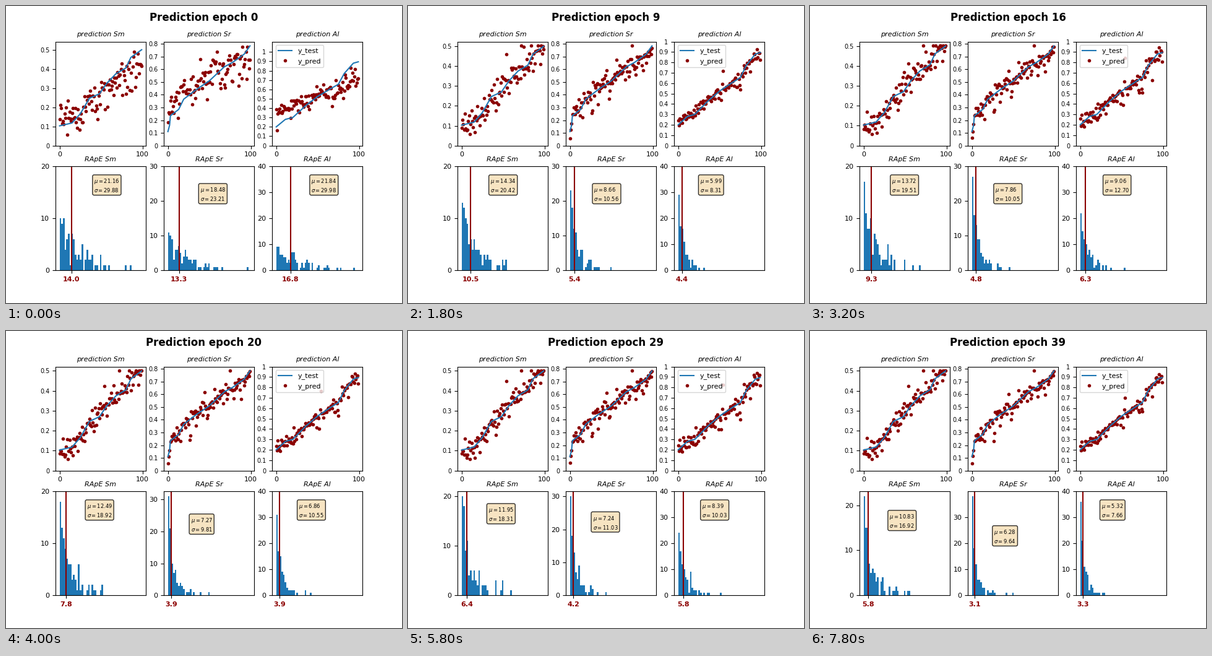
Write a matplotlib script that moves like this. It is 640 px wide and 480 px high and loops after 8000 ms.

```python
import matplotlib.pyplot as plt
import numpy as np
from matplotlib.animation import FuncAnimation

EPOCHS = 40
N = 100
IDX = np.arange(N)
BINS = np.arange(0, 100, 2)
MARKS = [0, 9, 16, 20, 29, 35, 39]

# curve: key points of y_test; start: offset, slope and spread of the first fit;
# peak: largest value before and after training
PANELS = [
    dict(
        name="Sm", ticks=6, count_step=10, count_ticks=3, box_y=15,
        start=(.06, .72, .045), peak=(.52, .5),
        curve=[(0, .103), (15, .118), (25, .166), (36, .247), (48, .27),
               (57, .325), (68, .375), (80, .405), (86, .46), (99, .5)],
        median=[14.0, 10.5, 9.3, 7.8, 6.4, 5.8, 5.8],
        mean=[21.16, 14.34, 13.72, 12.49, 11.95, 11.10, 10.83],
        sigma=[29.88, 20.42, 19.51, 18.92, 18.31, 17.10, 16.92]),
    dict(
        name="Sr", ticks=9, count_step=10, count_ticks=4, box_y=20,
        start=(.17, .70, .07), peak=(.785, .785),
        curve=[(0, .11), (2, .16), (3, .235), (13, .285), (19, .365), (34, .44),
               (50, .51), (68, .62), (78, .655), (92, .72), (99, .785)],
        median=[13.3, 5.4, 4.8, 3.9, 4.2, 3.4, 3.1],
        mean=[18.48, 8.66, 7.86, 7.27, 7.24, 6.50, 6.28],
        sigma=[23.21, 10.56, 10.05, 9.81, 11.03, 9.95, 9.64]),
    dict(
        name="Al", ticks=11, count_step=10, count_ticks=5, box_y=30,
        start=(.24, .55, .06), peak=(1.065, .94),
        curve=[(0, .2), (11, .28), (20, .3), (36, .43), (50, .525),
               (65, .605), (75, .655), (82, .77), (93, .88), (99, .895)],
        median=[16.84, 4.4, 6.3, 3.9, 5.8, 3.7, 3.3],
        mean=[21.84, 5.99, 9.06, 6.86, 8.39, 5.32, 5.32],
        sigma=[29.98, 8.31, 12.70, 10.55, 10.03, 7.67, 7.66]),
]


class Panel:
    def __init__(self, spec, upper, lower, seed):
        self.spec = spec
        rng = np.random.default_rng(seed)
        test = np.interp(IDX, *zip(*spec["curve"]))
        base, slope, spread = spec["start"]
        self.test = test
        self.first = (base + slope * test + spread * rng.normal(size=N)) / test - 1
        self.last = .4 * spread * rng.standard_t(3, N) / test
        self.sway = .4 * spread / test
        self.phase = rng.uniform(0, 2 * np.pi, N)
        self.rate = rng.uniform(.3, 1.2, N)

        self.upper = upper
        upper.set_title(f"prediction {spec['name']}", fontsize=8, style="italic")
        upper.plot(IDX, test, label="y_test", zorder=2.2)
        self.dots, = upper.plot(IDX, test, ".", color="darkred", label="y_pred")
        upper.set_xlim(-4.95, 103.95)
        upper.set_xticks([0, 100])
        upper.tick_params(axis="x", labelsize=8)
        ticks = np.arange(spec["ticks"]) / 10
        upper.set_yticks(ticks, [f"{t:g}" for t in ticks], fontsize=7)

        self.lower = lower
        lower.set_title(f"RApE {spec['name']}", fontsize=8, style="italic")
        self.bars = lower.stairs(np.zeros(len(BINS) - 1), BINS, fill=True, color="C0")
        self.line = lower.axvline(0, color="darkred")
        self.box = lower.text(0, spec["box_y"], "", fontsize=6, bbox=dict(
            boxstyle="round", facecolor="wheat", alpha=.8))
        lower.set_xlim(-4.9, 102.9)
        lower.set_yticks(np.arange(spec["count_ticks"]) * spec["count_step"])
        lower.tick_params(axis="y", labelsize=8)

    def stats(self, epoch):
        return [np.interp(epoch, MARKS, self.spec[key])
                for key in ("median", "mean", "sigma")]

    def errors(self, epoch, early):
        """Signed percentage errors with the epoch's median and tail."""
        wave = np.cos(self.phase + self.rate * epoch)
        raw = (self.last + early * (self.first - self.last)
               + (1 - early) * np.exp(-epoch / 10) * self.sway * wave)
        rank = np.abs(raw).argsort().argsort()
        level = -np.log2(1 - (rank + .5) / N)
        median, mean, _ = self.stats(epoch)
        tail = 1 + (np.log(mean / median) - .367) / .9
        size = median * np.where(level < 1, level ** 1.1, level ** tail)
        return np.maximum(np.sign(raw) * size * np.exp(.15 * wave), -48)

    def show(self, epoch):
        early = np.exp(-epoch / 4)
        peak = np.interp(early, [0, 1], self.spec["peak"][::-1])
        err = self.errors(epoch, early)
        self.dots.set_ydata(np.minimum(self.test * (1 + err / 100), peak))
        self.upper.set_ylim(0, max((self.spec["ticks"] - 1) / 10, 1.0425 * peak))

        counts = np.histogram(np.abs(err), BINS)[0]
        self.bars.set_data(counts)
        last_tick = (self.spec["count_ticks"] - 1) * self.spec["count_step"]
        self.lower.set_ylim(0, max(last_tick, 1.05 * counts.max()))
        median, mean, sigma = self.stats(epoch)
        self.line.set_xdata([median, median])
        self.lower.set_xticks([median], [f"{median:.1f}"], fontsize=8,
                              color="darkred", weight="bold")
        self.box.set_x(mean + 20)
        self.box.set_text(f"$\\mu={mean:.2f}$\n$\\sigma={sigma:.2f}$")


fig, axes = plt.subplots(2, 3, figsize=(6.4, 4.8), dpi=100)
heading = fig.suptitle("", fontsize=12, weight="bold")
panels = [Panel(spec, axes[0, i], axes[1, i], seed=11 + i)
          for i, spec in enumerate(PANELS)]
axes[0, 2].legend(loc="upper left", fontsize=8)


def update(epoch):
    heading.set_text(f"Prediction epoch {epoch}")
    for panel in panels:
        panel.show(epoch)


anim = FuncAnimation(fig, update, frames=EPOCHS, interval=200,
                     repeat=True, repeat_delay=0, blit=False)
plt.show()
```
